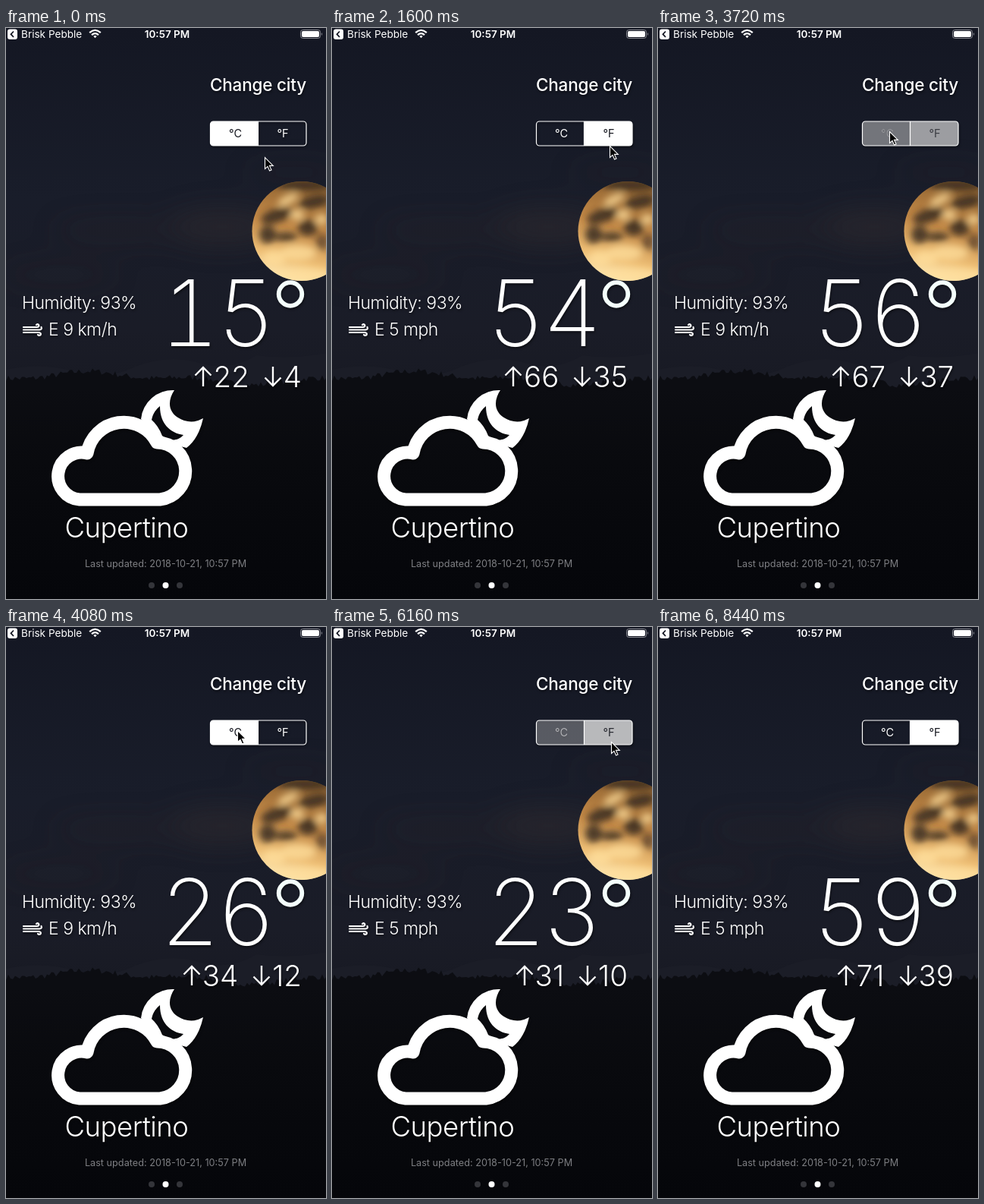
Animation of 422 by 752 pixels, one loop 8520 ms. Source, as an HTML page:

```html
<!DOCTYPE html>
<html lang="en">
<head>
<meta charset="utf-8">
<title>Weather</title>
<style>
  html, body { margin: 0; width: 100%; height: 100%; overflow: hidden; background: #07080c; }
  body { font-family: Inter, Roboto, sans-serif; font-optical-sizing: none; color: #fff; }
  svg { display: block; }
  #scene { position: absolute; left: 0; top: 0; }
  #scene text { fill: #fff; }
  .shade, #range { filter: drop-shadow(1px 2px 1.5px rgba(0, 0, 0, .5)); }
  .light { font-size: 23px; font-weight: 300; letter-spacing: -.5px; }
  #temp { font-size: 121px; font-weight: 250; letter-spacing: -4px; font-feature-settings: "tnum"; fill: #f4fffc; }
  .unit { font-size: 14.5px; text-anchor: middle; }
  #scene .on { fill: #15171f; }
  #range {
    position: absolute; right: calc(100% - 390px); top: 439px;
    display: flex; align-items: flex-start; white-space: nowrap;
    font-size: 38.5px; font-weight: 300; line-height: 40px;
  }
  #range svg { margin: 6px 2px 0 0; fill: none; stroke: #fff; stroke-width: 2.4; }
  #range .down { margin-left: 19px; transform: rotate(180deg); }
</style>
</head>
<body>
<svg id="scene" width="422" height="752" viewBox="0 0 422 752">
  <defs>
    <linearGradient id="sky" x2="0" y2="1">
      <stop offset="0" stop-color="#141723"/>
      <stop offset=".45" stop-color="#191d2a"/>
      <stop offset=".8" stop-color="#1a1c27"/>
      <stop offset="1" stop-color="#171922"/>
    </linearGradient>
    <linearGradient id="ground" x2="0" y2="1">
      <stop offset="0" stop-color="#0c0d12"/>
      <stop offset=".35" stop-color="#090a0e"/>
      <stop offset="1" stop-color="#05060a"/>
    </linearGradient>
    <linearGradient id="gold" x1=".6" x2=".4" y2="1">
      <stop offset="0" stop-color="#8c602f"/>
      <stop offset=".45" stop-color="#c48a48"/>
      <stop offset=".75" stop-color="#eebf76"/>
      <stop offset="1" stop-color="#fff0c4"/>
    </linearGradient>
    <filter id="soft" x="-50%" y="-50%" width="200%" height="200%"><feGaussianBlur stdDeviation="5"/></filter>
    <filter id="haze" x="-50%" y="-100%" width="200%" height="300%"><feGaussianBlur stdDeviation="18"/></filter>
    <clipPath id="disc"><circle cx="390" cy="267.500" r="65.500"/></clipPath>
  </defs>

  <rect width="422" height="500" fill="url(#sky)"/>
  <g filter="url(#haze)" fill="#3a3030" opacity=".42">
    <ellipse cx="285" cy="262" rx="75" ry="24"/>
    <ellipse cx="150" cy="266" rx="90" ry="14" opacity=".6"/>
    <ellipse cx="70" cy="325" rx="80" ry="15" opacity=".4"/>
    <ellipse cx="380" cy="190" rx="70" ry="10" opacity=".5"/>
  </g>
  <g clip-path="url(#disc)">
    <rect x="320" y="200" width="102" height="136" fill="url(#gold)"/>
    <g filter="url(#soft)">
      <g fill="#38291f" opacity=".85">
        <ellipse cx="393" cy="207" rx="36" ry="7"/>
        <ellipse cx="406" cy="229" rx="21" ry="8" transform="rotate(-12 406 229)"/>
        <ellipse cx="357" cy="247" rx="22" ry="9" transform="rotate(-18 357 247)"/>
        <ellipse cx="398" cy="263" rx="13" ry="11"/>
        <ellipse cx="345" cy="272" rx="11" ry="12"/>
        <ellipse cx="369" cy="275" rx="15" ry="6"/>
        <ellipse cx="417" cy="282" rx="9" ry="11" opacity=".7"/>
      </g>
      <g fill="#ffdf9c" opacity=".75">
        <ellipse cx="372" cy="226" rx="15" ry="6" transform="rotate(-25 372 226)"/>
        <ellipse cx="384" cy="246" rx="9" ry="7"/>
        <ellipse cx="416" cy="252" rx="8" ry="7"/>
        <ellipse cx="385" cy="296" rx="24" ry="10"/>
        <ellipse cx="354" cy="303" rx="15" ry="11"/>
        <ellipse cx="390" cy="326" rx="45" ry="10"/>
      </g>
    </g>
  </g>
  <path d="M0 450Q45 440 90 452T170 446Q215 429 255 441T330 431Q375 437 422 428V500H0Z" fill="#1b1d27"/>
  <path id="trees" fill="#0c0d12"/>
  <rect y="474" width="422" height="278" fill="url(#ground)"/>

  <!-- status bar -->
  <rect x="2" y="1.500" width="13" height="13.500" rx="3" fill="#fff"/>
  <path d="M10 4.500L6.500 8.200L10 12" fill="none" stroke="#141723" stroke-width="1.800"/>
  <text x="20" y="13" font-size="13.600">Brisk Pebble</text>
  <g fill="none" stroke="#fff" stroke-width="2.300">
    <path d="M110.200 6.200Q117.500 -.5 124.800 6.200M113 9.200Q117.500 5 122 9.200"/>
    <path d="M117.500 13.200L115.300 10.800Q117.500 9 119.700 10.800Z" fill="#fff" stroke="none"/>
  </g>
  <text x="212.500" y="13" font-size="13.500" font-weight="600" text-anchor="middle">10:57 PM</text>
  <rect x="388.500" y="2.500" width="26" height="11" rx="3" fill="none" stroke="#8b8d94"/>
  <rect x="390" y="4" width="23" height="8" rx="1.800" fill="#fff"/>
  <path d="M416 6Q418 8 416 10Z" fill="#8b8d94"/>

  <g class="shade">
    <text x="396" y="83" font-size="22.500" font-weight="500" letter-spacing="-.2" text-anchor="end">Change city</text>
    <rect x="269.500" y="123" width="126.500" height="32" rx="4" fill="none" stroke="#fff" stroke-width="1.200"/>
    <path d="M332.500 123V155" stroke="#fff" stroke-width="1.200"/>
    <g id="celsius">
      <path d="M333 123H273.500a4 4 0 0 0-4 4V151a4 4 0 0 0 4 4H333Z" fill="#fff"/>
      <text class="unit on" x="302.500" y="144">°C</text>
      <text class="unit" x="365" y="144">°F</text>
    </g>
    <g id="fahrenheit">
      <path d="M332 123H392a4 4 0 0 1 4 4V151a4 4 0 0 1-4 4H332Z" fill="#fff"/>
      <text class="unit" x="302.500" y="144">°C</text>
      <text class="unit on" x="365" y="144">°F</text>
    </g>
  </g>

  <g class="shade">
    <text class="light" x="21" y="370">Humidity: 93%</text>
    <g fill="none" stroke="#fff" stroke-width="2.200" stroke-linecap="round">
      <path d="M23 394H40.500Q44.500 393.500 43 390.800Q41.500 389.500 40 391"/>
      <path d="M23 397.500H44Q48 397 46.500 394"/>
      <path d="M23 401H43Q47 401.500 45.500 404.300Q43.500 405.500 42 404M27 401H36"/>
    </g>
    <text id="wind" class="light" x="56" y="405"></text>
    <text id="temp" x="352" y="419" text-anchor="end"></text>
    <circle cx="375" cy="350.500" r="15.300" fill="none" stroke="#f4fffc" stroke-width="5.800"/>
  </g>

  <g class="shade">
    <path d="M97 621A31 31 0 1 1 107 560A49 49 0 0 1 199 546A37.600 37.600 0 0 1 203 621Z"
          fill="none" stroke="#fff" stroke-width="17" stroke-linejoin="round"/>
    <path fill="#fff" fill-rule="evenodd"
          d="M222 477A42 42 0 0 0 178 515L200 543L238 553Q254 541 260 514Q248 521 235 517C215 510 211 494 222 477Z
             M203 498C203 520 215 533 234 536C226 545 214 544 206 537Q201 524 192 516Q194 505 203 498Z"/>
    <text x="159" y="671" font-size="36.500" font-weight="350" letter-spacing="-.5" text-anchor="middle">Cupertino</text>
  </g>

  <text x="210.500" y="710" font-size="12.700" text-anchor="middle" style="fill:#7d7e82">Last updated: 2018-10-21, 10:57 PM</text>
  <g fill="#34353a">
    <circle cx="192" cy="734" r="4"/>
    <circle cx="210.500" cy="734" r="4" fill="#fff"/>
    <circle cx="229" cy="734" r="4"/>
  </g>
</svg>

<div id="range">
  <svg width="24" height="28"><path d="M12 27V2M1.500 12.500L12 2L22.500 12.500"/></svg>
  <span id="high"></span>
  <svg class="down" width="24" height="28"><path d="M12 27V2M1.500 12.500L12 2L22.500 12.500"/></svg>
  <span id="low"></span>
</div>

<svg id="cursor" width="14" height="22" style="position:absolute;left:0;top:0;overflow:visible">
  <path d="M.5 .5V15.500L4 12.300L6.600 18L9 17L6.500 11.400H11.300Z" fill="#000" stroke="#fff" stroke-width="1.100"/>
</svg>

<script>
const LOOP = 8520, STEP = 40, FADE = 200, CURSOR_GONE = 7200;
const $ = id => document.getElementById(id);
const mix = (a, b, p) => a + (b - a) * p;
const clamp = v => Math.min(1, Math.max(0, v));

const COLD = { temp: 15, high: 22, low: 4 };
const WARM = { temp: 59, high: 70.9, low: 39.2 };
// Each click flips the unit and runs the counters.
const clicks = [
  { at: 1060, span: 880, warm: 1 },
  { at: 3638, span: 960, warm: 0 },
  { at: 6019, span: 957, warm: 1 }
];
// time, x, y of the pointer tip
const route = [
  [0, 341, 170], [720, 363, 137], [1080, 363, 137], [1400, 366, 155], [2150, 366, 155],
  [2820, 326, 136], [3360, 305, 136], [4760, 305, 136], [5760, 368, 151], [LOOP, 368, 151]
];

// cubic-bezier(.25, .1, .25, 1)
function ease(u) {
  if (u <= 0 || u >= 1) return clamp(u);
  const bezier = (a, b, s) => 3 * (1 - s) ** 2 * s * a + 3 * (1 - s) * s * s * b + s ** 3;
  let lo = 0, hi = 1;
  for (let i = 0; i < 20; i++) {
    const mid = (lo + hi) / 2;
    if (bezier(.25, .25, mid) < u) lo = mid; else hi = mid;
  }
  return bezier(.1, 1, lo);
}

function pointer(t) {
  const i = route.findIndex(p => p[0] > t);
  const [t0, x0, y0] = route[i - 1], [t1, x1, y1] = route[i];
  const u = (t - t0) / (t1 - t0), p = u * u * (3 - 2 * u);
  return [mix(x0, x1, p), mix(y0, y1, p)];
}

function setText(id, value) {
  const node = $(id);
  if (node.textContent !== String(value)) node.textContent = value;
}

function draw(t) {
  const click = clicks.filter(c => c.at <= t).pop() || { at: -LOOP, span: 1, warm: 0 };
  const toward = p => click.warm ? p : 1 - p;
  const heat = toward(ease((t - click.at) / click.span));
  const flip = toward(clamp((t - click.at) / FADE));

  for (const id in COLD) setText(id, Math.round(mix(COLD[id], WARM[id], heat)));
  setText("wind", click.warm ? "E 5 mph" : "E 9 km/h");
  $("celsius").style.opacity = 1 - flip;
  $("fahrenheit").style.opacity = flip;

  const [x, y] = pointer(t);
  $("cursor").style.transform = `translate(${x}px, ${y}px)`;
  $("cursor").style.visibility = t < CURSOR_GONE ? "visible" : "hidden";
}

function plantTrees() {
  let seed = 7, d = "M0 480";
  const random = () => (seed = seed * 16807 % 2147483647) / 2147483647;
  for (let x = 0; x <= 424; x += 3) {
    const ridge = 465 - 6 * Math.sin(x / 70) + 3 * Math.sin(x / 23);
    d += `L${x} ${(ridge - 8 * random()).toFixed(1)}`;
  }
  $("trees").setAttribute("d", d + "V480Z");
}

function tick() {
  draw(Math.floor(performance.now() % LOOP / STEP) * STEP);
  requestAnimationFrame(tick);
}

plantTrees();
tick();
</script>
</body>
</html>
```
